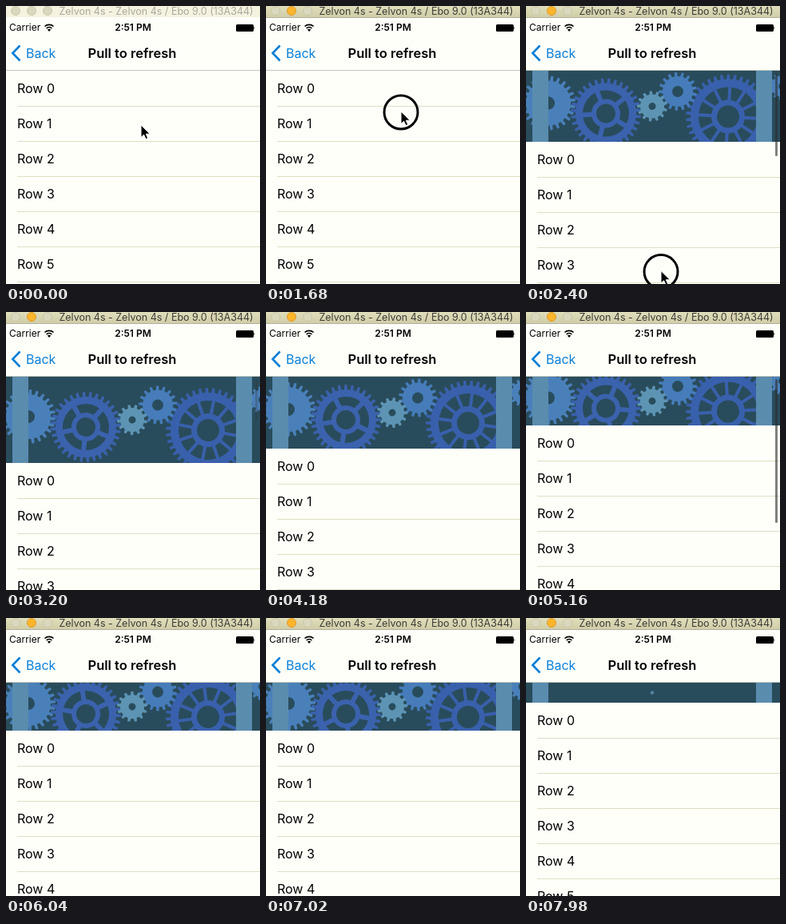
Write an HTML page with a canvas that moves like this. It is 318 px wide and 348 px high and loops after 8000 ms.

```html
<!DOCTYPE html>
<html lang="en">
<head>
<meta charset="utf-8">
<title>Pull to refresh</title>
<style>
html, body { margin: 0; width: 100%; height: 100%; overflow: hidden; background: #fffffa; }
#stage { position: relative; width: 318px; height: 348px; overflow: hidden; background: #fffffa;
  font: 16px/20px Inter, "Liberation Sans", sans-serif; color: #000; }
#stage > * { position: absolute; }
#list { left: 0; top: 82px; width: 318px; }
.row { height: 43px; margin-left: 14px; line-height: 43px; border-bottom: 1px solid #dfdfc2; }
#gears { left: 0; top: 81px; }
#nav { left: 0; top: 0; width: 318px; height: 80px; background: #fffffa; border-bottom: 1px solid #c6c6b8; }
#nav span, #nav svg { position: absolute; white-space: nowrap; }
#nav .mid { left: 0; width: 318px; text-align: center; font-weight: 600; }
#nav .title { left: -1px; top: 49px; font-size: 16.5px; }
#bar { position: absolute; left: 0; top: 0; width: 318px; height: 14px; background: #f5f3e0; color: #aaa89f; }
#bar.on { background: linear-gradient(#e0debb, #d0cda8); color: #3e3d38; box-shadow: 0 1px #b3b09f; }
#bar i { position: absolute; top: 0; width: 10px; height: 10px; border-radius: 50%;
  background: #dad8bd; border: 1px solid #c9c6aa; }
#bar.on .min { background: #fdb52c; border-color: #dd9a2c; }
#bar span { left: 60px; width: 256px; top: -3px; text-align: center; font-size: 12.5px; }
.small { font-size: 12px; top: 17px; }
#thumb { left: 312px; top: 84px; width: 3px; border-radius: 2px; background: #2c2c2a; }
#mouse { left: 0; top: 0; overflow: visible; }
</style>
</head>
<body>
<div id="stage">
  <div id="list"></div>
  <canvas id="gears"></canvas>
  <div id="thumb"></div>
  <div id="nav">
    <div id="bar">
      <i style="left:6px"></i><i class="min" style="left:26px"></i><i style="left:46px"></i>
      <span>Zelvon 4s - Zelvon 4s / Ebo 9.0 (13A344)</span>
    </div>
    <span class="small" style="left:4px">Carrier</span>
    <span class="small mid">2:51 PM</span>
    <span style="left:25px;top:49px;color:#0a7fd8">Back</span>
    <span class="mid title">Pull to refresh</span>
    <svg width="318" height="80" style="left:0;top:0" fill="none">
      <path d="M48.5 25.5a8 8 0 0 1 11 0M50.6 28a5 5 0 0 1 6.8 0" stroke="#000" stroke-width="1.7"/>
      <path d="M54 32l-2.2-2.4a3.4 3.4 0 0 1 4.4 0z" fill="#000"/>
      <rect x="288" y="23" width="22" height="9" rx="1.5" fill="#000"/>
      <path d="M310.5 25.6q1.8 1.9 0 3.8z" fill="#000"/>
      <path d="M17.5 49.5L8.3 59l9.2 9.5" stroke="#0a7fd8" stroke-width="2.6"/>
    </svg>
  </div>
  <svg id="mouse" width="1" height="1">
    <circle id="press" r="21" cy="1" fill="none" stroke="#000" stroke-width="3"/>
    <path d="M0 0v15.5l3.6-3.3 2.4 5.4 2.7-1.2-2.4-5.2h5z" fill="#000" stroke="#fff" stroke-width="1"/>
  </svg>
</div>
<script>
const $ = id => document.getElementById(id);
const LOOP = 8000, W = 318, H = 150, TAU = Math.PI * 2;
const PRESS = 1640, DRAG = 1940, RELEASE = 4045, CLOSE = 7650;
const REST = 60, PULL = 253;
const ramp = (t, a, b) => Math.min(1, Math.max(0, (t - a) / (b - a)));
const ease = u => u * u * (3 - 2 * u);

for (let i = 0; i < 8; i++) {
  const row = document.createElement('div');
  row.className = 'row';
  row.textContent = 'Row ' + i;
  $('list').append(row);
}

const canvas = $('gears'), ctx = canvas.getContext('2d');
const dpr = window.devicePixelRatio || 1;
canvas.width = W * dpr;
canvas.height = H * dpr;
canvas.style.width = W + 'px';
canvas.style.height = H + 'px';

// y is measured from the middle of the revealed strip
const gears = [
  { x: 28, y: -4, r: 34, teeth: 24, dir: 1, hole: 8, color: '#4a80ba' },
  { x: 100, y: 9, r: 44, teeth: 32, dir: -1, hole: 12, hub: 18, rim: 29, spokes: 5, color: '#3b62ad' },
  { x: 253, y: 13, r: 53, teeth: 38, dir: 1, hole: 14, hub: 21, rim: 37, spokes: 12, color: '#3960ac' },
  { x: 190, y: -18.5, r: 24, teeth: 17, dir: -1, hole: 7, color: '#467cba' },
  { x: 321, y: -25, r: 17, teeth: 13, dir: 1, hole: 5, color: '#4a80ba' },
  { x: 158, y: 0, r: 19, teeth: 13, dir: 1, hole: 4.5, color: '#5d94b4', main: true }
];

function disc(r) {
  ctx.moveTo(r, 0);
  ctx.arc(0, 0, r, 0, TAU);
}

function drawGear(g, mid, phase, scale) {
  if (scale <= 0) return;
  const root = g.r - Math.min(6, g.r * 0.21), step = TAU / g.teeth;
  ctx.save();
  ctx.translate(g.x, mid + g.y * scale);
  ctx.scale(scale, scale);
  ctx.rotate(g.dir * phase / g.teeth);
  ctx.beginPath();
  for (let i = 0; i < g.teeth; i++) {
    const a = i * step;
    ctx.arc(0, 0, root, a - step / 2, a - step * 0.27);
    ctx.arc(0, 0, g.r, a - step * 0.17, a + step * 0.17);
    ctx.arc(0, 0, root, a + step * 0.27, a + step / 2);
  }
  ctx.closePath();
  disc(g.hole);
  for (let i = 0; i < (g.spokes || 0); i++) {
    const a = i * TAU / g.spokes, b = a + TAU / g.spokes;
    const half = g.spokes > 6 ? 2 : 3;
    const out = half / g.rim, inn = half / g.hub;
    ctx.moveTo(g.rim * Math.cos(a + out), g.rim * Math.sin(a + out));
    ctx.arc(0, 0, g.rim, a + out, b - out);
    ctx.arc(0, 0, g.hub, b - inn, a + inn, true);
    ctx.closePath();
  }
  ctx.fillStyle = g.color;
  ctx.fill('evenodd');
  ctx.restore();
}

const drag = t => PULL * ease(ramp(t, DRAG, DRAG + 655));

function offset(t) {
  if (t >= CLOSE) return REST * (1 - ease(ramp(t, CLOSE, CLOSE + 600)));
  if (t >= RELEASE) return REST + 48 * Math.exp((RELEASE - t) / 285);
  const x = drag(t) * 0.55 / 480; // rubber band
  return 480 * (1 - 1 / (x + 1));
}

function drawStrip(t, d) {
  ctx.setTransform(dpr, 0, 0, dpr, 0, 0);
  ctx.clearRect(0, 0, W, H);
  if (d <= 0) return;
  ctx.save();
  ctx.beginPath();
  ctx.rect(0, 0, W, d);
  ctx.clip();
  ctx.fillStyle = '#294c5c';
  ctx.fillRect(0, 0, W, d);
  const phase = Math.min(d, 110) * 0.25 + Math.max(0, t - RELEASE) * 0.02;
  const shrink = 1 - ease(ramp(t, 7200, 7900));
  for (const g of gears) drawGear(g, d / 2, phase, g.main ? Math.max(0.12, shrink) : shrink);
  ctx.fillStyle = '#5a8cae';
  ctx.fillRect(8, 0, 20, d);
  ctx.fillRect(288, 0, 20, d);
  ctx.restore();
}

function thumbAlpha(t) {
  if (t < DRAG) return 0;
  if (t < RELEASE) return 0.6 * (1 - ramp(t, 2700, 3600));
  return 0.6 * ramp(t, 4300, 4500) * (1 - ramp(t, 5200, 5600));
}

function render(t) {
  const d = Math.round(offset(t));
  $('list').style.transform = `translateY(${d}px)`;
  drawStrip(t, d);
  $('bar').className = t >= PRESS ? 'on' : '';
  $('thumb').style.opacity = thumbAlpha(t);
  $('thumb').style.height = Math.max(40, 180 - 2.714 * (d - 61)) + 'px';
  const y = 149 - 17 * ease(ramp(t, 1120, 1560)) + drag(t);
  $('mouse').style.transform = `translate(169px, ${y}px)`;
  $('press').style.display = t >= PRESS && t < RELEASE ? '' : 'none';
}

const start = performance.now();
function tick() {
  render((performance.now() - start) % LOOP);
  requestAnimationFrame(tick);
}
tick();
</script>
</body>
</html>
```
